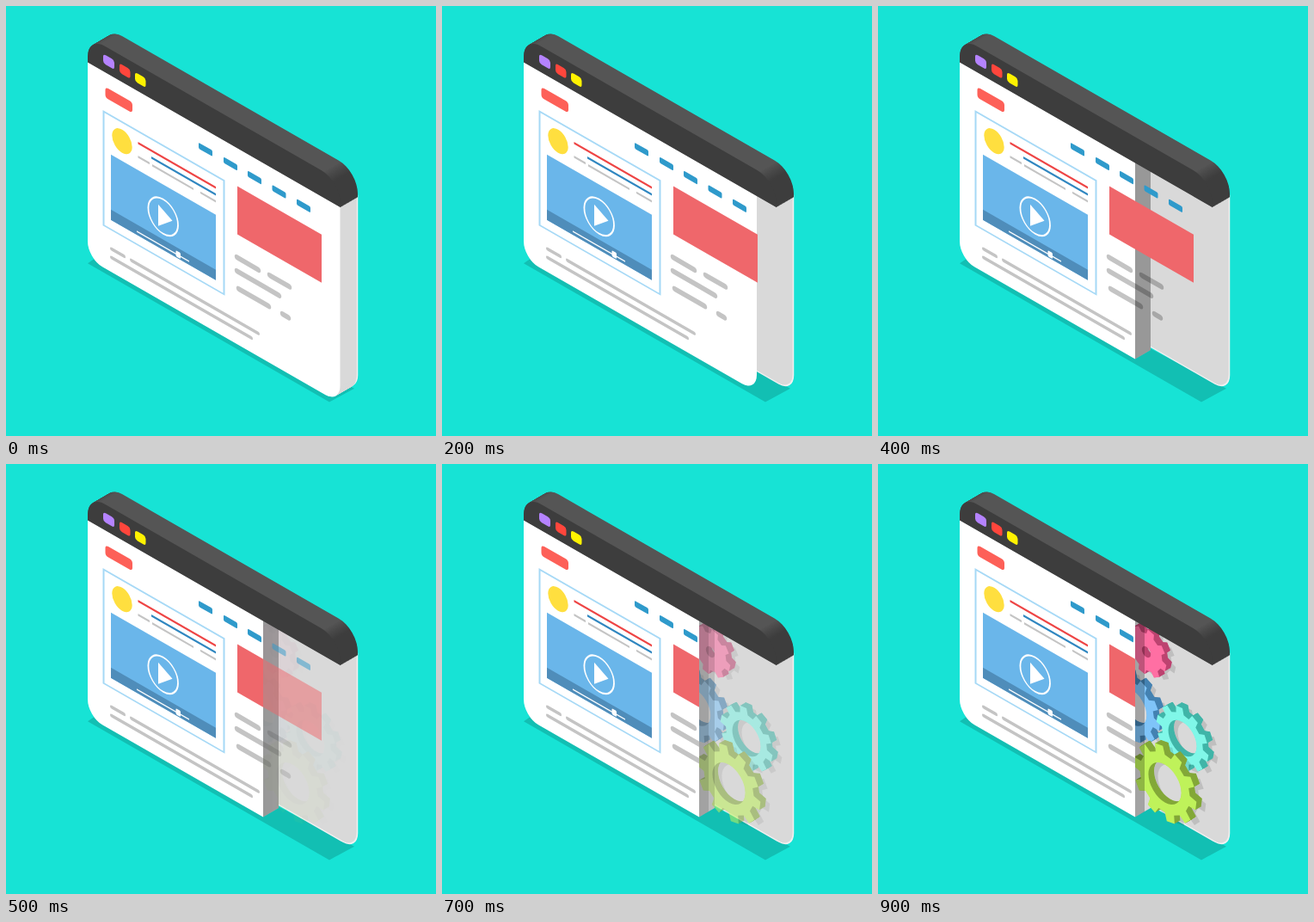
Recreate the animation shown at these times as an HTML page. Size 500x500 px, loop 1 s.

```html
<!DOCTYPE html>
<html lang="en">
<head>
<meta charset="utf-8">
<title>Browser window</title>
<style>
html, body { margin: 0; height: 100%; overflow: hidden; background: #17e3d5 }
svg { display: block; width: 100vw; height: 100vh }
.pill { stroke: #000; stroke-opacity: .23; stroke-width: 6.5; stroke-linecap: round }
.line { stroke: #c4c4c4; stroke-width: 4; stroke-linecap: round }
.thin { stroke-width: 2.4 }
</style>
</head>
<body>
<svg viewBox="0 0 500 500" fill="none">
  <defs>
    <linearGradient id="edge" gradientUnits="userSpaceOnUse" x1="95" x2="389" y1="0" y2="0">
      <stop offset="0" stop-color="#404040"/><stop offset=".05" stop-color="#555"/>
      <stop offset=".93" stop-color="#555"/><stop offset=".97" stop-color="#3d3d3d"/>
    </linearGradient>
    <clipPath id="near"><path d="M0-300H299V500H0z"/></clipPath>
    <clipPath id="far"><path d="M299-300H500V500H299z"/></clipPath>
    <g id="content">
      <g id="nav" fill="#2f9acb"></g>
      <path fill="#ef676b" d="M269 54h98v56h-98z"/>
      <path class="pill" d="M269 137h24M307 136h22M269 153h48M271 172.500h34M322 172.500h6"/>
    </g>
  </defs>
  <!-- isometric front plane: y grows along x -->
  <g transform="matrix(1 .574 0 1 0 1.200)">
    <path fill="#12bfb3" d="M95 243.500H376L405 211 300 216 112 222z"/>
    <path id="back" fill="#d9d9d9" stroke="#f1f1f1" stroke-width="1.500" transform="translate(20 -24.500)"/>
    <g id="side"></g>
    <path id="base" fill="#d9d9d9" d="M299 9l18-20.800v228.700l-18 20.800z"/>
    <g id="gears"></g>
    <path id="wide" fill="#000" d="M299 9l18-20.800v228.700l-18 20.800z"/>
    <path id="slim" fill="#000" d="M299 9l11-12.700v228.700l-11 12.700z"/>
    <path id="front" fill="#fff"/>
    <rect x="115.500" y="26.500" width="31.500" height="12.500" rx="3.500" fill="#fd6058"/>
    <path stroke="#a6d9f6" stroke-width="2" d="M113.500 56.300H253.500V188.500H113.500z"/>
    <ellipse cx="135" cy="78.500" rx="11.700" ry="13.500" fill="#ffdf3f"/>
    <path class="thin" stroke="#ee4444" d="M153.500 70h90.500"/>
    <path class="thin" stroke="#2f86c0" d="M169 78h75"/>
    <path class="thin" stroke="#c4c4c4" d="M153.500 86h13.500M170 86.500h48M226 86h18"/>
    <path fill="#6ab6ea" d="M122 101.500h122v76H122z"/>
    <path fill="#4f8dba" d="M122 165.500h122v12H122z"/>
    <path stroke="#fff" stroke-width="1.500" d="M152 173.500h61"/>
    <rect x="197.500" y="169.500" width="5.500" height="7" rx="1.500" fill="#fff"/>
    <ellipse cx="182.700" cy="138.700" rx="17.300" ry="20" stroke="#fff" stroke-width="1.800"/>
    <path fill="#fff" d="M177 128v25L193.500 137.500z"/>
    <path class="line" d="M123 211h14M146 211h147M123 221h162"/>
    <use href="#content" clip-path="url(#near)"/>
    <g id="rest"><use href="#content" clip-path="url(#far)"/></g>
    <g id="bar"></g>
    <rect x="113" y="-10.500" width="13" height="11" rx="3" fill="#b583ff"/>
    <rect x="132" y="-10.500" width="12.500" height="11" rx="3" fill="#ff463c"/>
    <rect x="150" y="-10.500" width="12.500" height="11" rx="3" fill="#fff200"/>
  </g>
</svg>
<script>
const $ = id => document.getElementById(id);

// Copies of a path stacked from back to front along the depth axis
function extrude(d, depth, side) {
  let out = '';
  for (let i = depth; i > 0; i -= .5)
    out += `<path d="${d}" fill="${side}" transform="translate(${i} ${-1.155 * i})"/>`;
  return out;
}

function panel(x, round) {
  const rx = round ? 17 : 0, ry = round ? 20 : 0;
  return `M95 9H${x}V${237.7 - ry}A${rx} ${ry} 0 0 1 ${x - rx} 237.7H112A17 20 0 0 1 95 217.7z`;
}

// x and y are on screen; the vertical place is brought back to the plane
function gear(x, y, r, hole, teeth, turn, face, side) {
  const cy = y - .574 * x - 1.2, pts = [];
  for (let i = 0; i < teeth; i++)
    for (const [a, k] of [[-.3, .79], [-.2, 1], [.2, 1], [.3, .79]]) {
      const t = (i + a + turn) * 2 * Math.PI / teeth;
      pts.push((x + .866 * r * k * Math.cos(t)).toFixed(1) + ' ' + (cy + r * k * Math.sin(t)).toFixed(1));
    }
  const w = .866 * hole;
  const d = `M${pts.join('L')}zM${x - w} ${cy}a${w} ${hole} 0 1 0 ${2 * w} 0a${w} ${hole} 0 1 0 ${-2 * w} 0z`;
  return `<g fill-rule="evenodd"><path d="${d}" fill="#000" opacity=".12" transform="translate(11 -4)"/>` +
    extrude(d, 6.5, side) + `<path d="${d}" fill="${face}"/></g>`;
}

const bar = 'M95 9.7V3A20 23 0 0 1 115-20.500H367A22 26 0 0 1 389 5.500V9.700z';
$('bar').innerHTML = extrude(bar, 20, 'url(#edge)') + `<path d="${bar}" fill="#3d3d3d"/>`;
$('nav').innerHTML = [232, 261, 289, 317.5, 346].map(x =>
  `<rect x="${x - 8}" y="29" width="16" height="7" rx="1.500"/>`).join('');
$('back').setAttribute('d', panel(388.5, true));
$('side').innerHTML = extrude(panel(388.5, true), 19, '#d9d9d9');
$('gears').innerHTML =
  gear(312, 218.5, 27, 6, 8, .3, '#ff6fa3', '#bd4370') +
  gear(295, 282.5, 38, 20, 10, .2, '#7fc4f9', '#4482b2') +
  gear(354, 319, 35, 19, 10, .3, '#80f7e8', '#40b5a8') +
  gear(333.5, 371.5, 42.5, 22, 10, .2, '#bff25a', '#83a838');

const cuts = [388.5, 384, 366, 333, 299];

function draw(now) {
  const step = Math.floor(now % 1000 / 100);
  const shown = step < 5 ? 0 : Math.min(1, (step - 5) * .25 + .05);
  $('front').setAttribute('d', panel(cuts[Math.min(step, 4)], step < 4));
  $('side').setAttribute('display', step ? 'none' : 'inline');
  $('base').setAttribute('display', step < 4 ? 'none' : 'inline');
  $('rest').setAttribute('opacity', step < 5 ? 1 : step === 5 ? .5 : 0);
  $('gears').setAttribute('opacity', shown);
  $('wide').setAttribute('opacity', step < 4 ? 0 : .3 * (1 - shown));
  $('slim').setAttribute('opacity', .25 * shown);
  requestAnimationFrame(() => draw(performance.now()));
}
draw(0);
</script>
</body>
</html>
```
